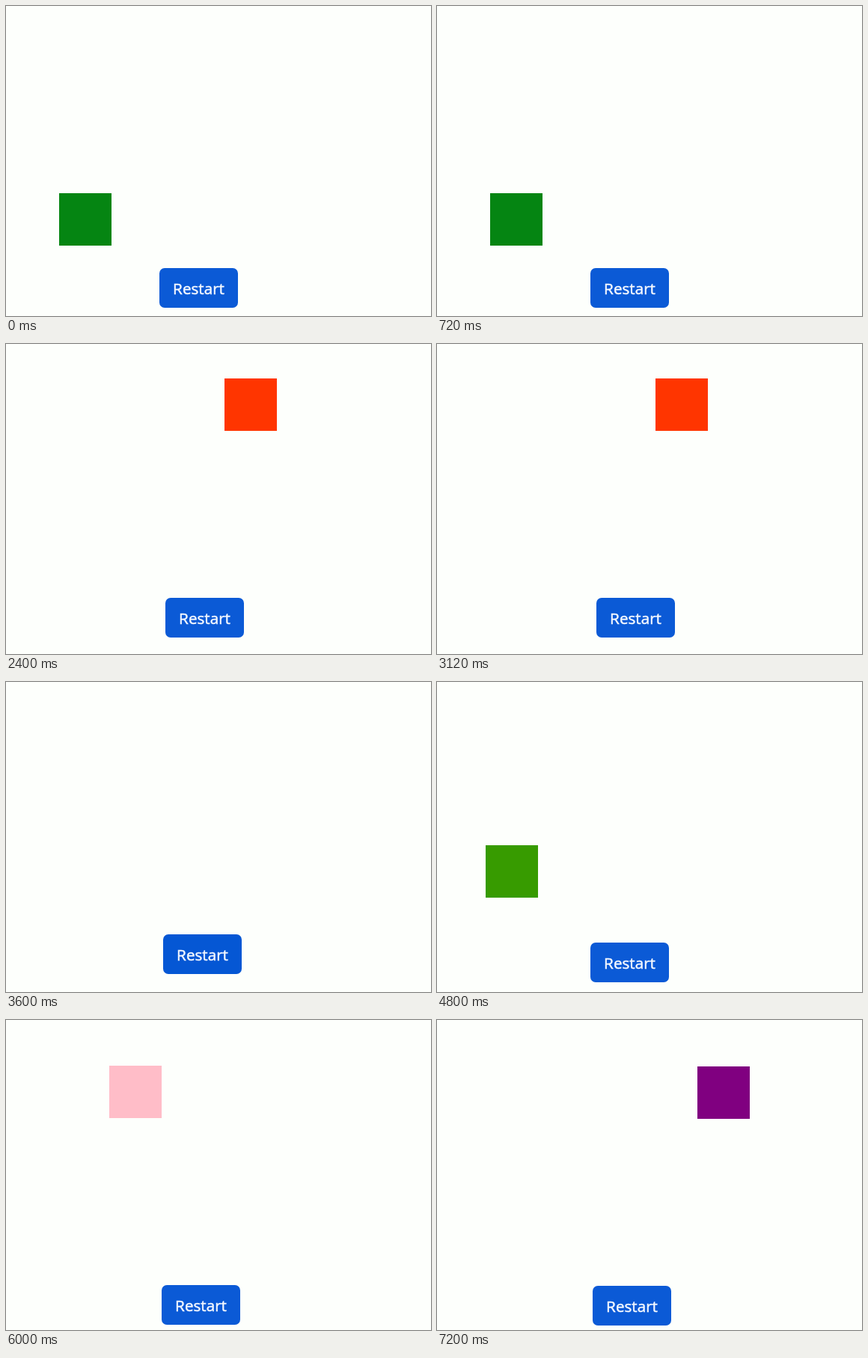
An HTML page with a canvas for the animation above (8 s loop, 568 by 414 pixels).

```html
<!DOCTYPE html>
<html lang="en">
<head>
<meta charset="utf-8">
<title>Moving square</title>
<style>
  html, body { margin: 0; width: 100%; height: 100%; overflow: hidden; background: #fdfffc; }
  canvas { display: block; }
</style>
</head>
<body>
<canvas id="stage" width="568" height="414"></canvas>
<script>
const ctx = document.getElementById("stage").getContext("2d");
const LOOP = 8000;
const STEP = 1200;
const SIDE = 70;
const BUTTON = { w: 105, h: 53, radius: 7 };
const IDLE = "#076bff";
const HOVER = "#0b5ad6";
const SOFT_EDGE = "blur(0.55px)";

// Each pose is held for one step; the picture changes without tweening.
const poses = [
  { square: [71, 250, "#058512"], button: [205, 350, HOVER] },
  { square: [70, 62, "#eff700"], button: [210, 341, IDLE] },
  { square: [292, 46, "#ff3500"], button: [213, 339, HOVER] },
  { button: [210, 337, "#0557d4"] },
  { square: [65, 218, "#379b00"], button: [205, 348, HOVER] },
  { square: [138, 61, "#ffbdc8"], button: [208, 354, HOVER] },
  { square: [348, 62, "#800080"], button: [208, 355, HOVER] }
];

function drawSquare(x, y, color) {
  ctx.fillStyle = color;
  ctx.fillRect(x, y, SIDE, SIDE);
}

function drawButton(x, y, color) {
  ctx.fillStyle = color;
  ctx.beginPath();
  ctx.roundRect(x, y, BUTTON.w, BUTTON.h, BUTTON.radius);
  ctx.fill();

  // A thin stroke gives the label a slightly heavier weight.
  ctx.fillStyle = ctx.strokeStyle = "#f4f8ff";
  ctx.lineWidth = 0.5;
  ctx.font = '20.7px "Open Sans", "Noto Sans", sans-serif';
  ctx.textAlign = "center";
  const label = ["Restart", x + BUTTON.w / 2, y + 35];
  ctx.fillText(...label);
  ctx.strokeText(...label);
}

function render(now) {
  const pose = poses[Math.floor((now % LOOP) / STEP)];
  ctx.filter = "none";
  ctx.fillStyle = "#fdfffc";
  ctx.fillRect(0, 0, 568, 414);
  ctx.filter = SOFT_EDGE;
  if (pose.square) drawSquare(...pose.square);
  drawButton(...pose.button);
}

let start;
function tick(now) {
  start ??= now;
  render(now - start);
  requestAnimationFrame(tick);
}
render(0);
requestAnimationFrame(tick);
</script>
</body>
</html>
```
